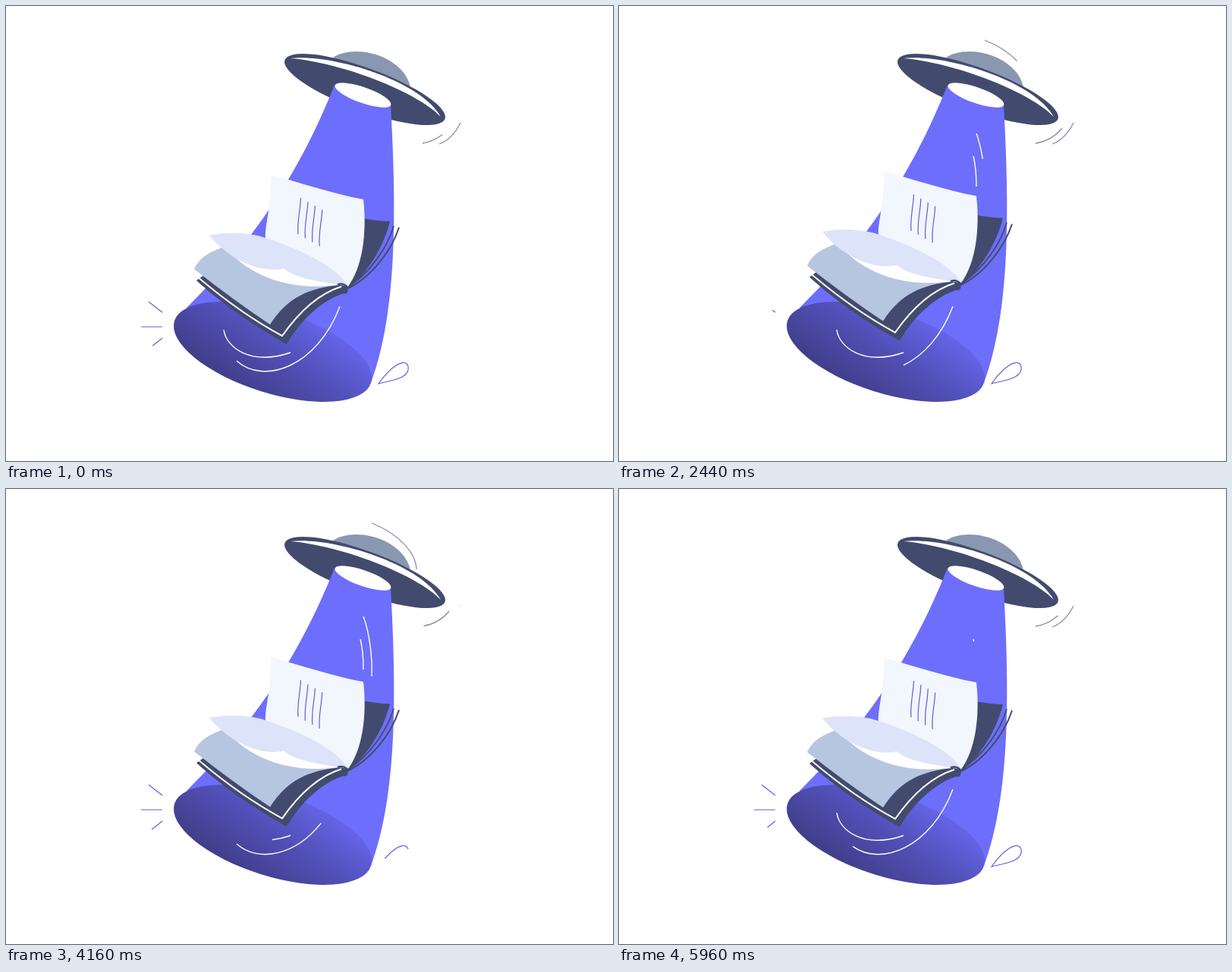
These frames come from a looping animation (800x600 px, 6000 ms). An HTML page with a canvas:

```html
<!DOCTYPE html>
<html lang="en">
<head>
<meta charset="utf-8">
<title>Saucer and book</title>
<style>
html, body { margin: 0; width: 100%; height: 100%; overflow: hidden; background: #fff; }
canvas { display: block; width: 800px; height: 600px; }
</style>
</head>
<body>
<canvas id="stage" width="800" height="600"></canvas>
<script>
const ctx = document.getElementById('stage').getContext('2d');

const NAVY = '#424b6d', BEAM = '#6d6efb', WHITE = '#fff';
const GREY = '#8b8ba6', INDIGO = '#625fd6';
const LOOP = 6000, CYCLE = 3000, STEP = 40;

const mod = (v, n) => ((v % n) + n) % n;
const clamp = v => Math.min(1, Math.max(0, v));

function fill(d, color) {
  ctx.fillStyle = color;
  ctx.fill(new Path2D(d));
}

function line(d, color, width) {
  ctx.strokeStyle = color;
  ctx.lineWidth = width;
  ctx.stroke(new Path2D(d));
}

function oval(x, y, rx, ry, deg, color) {
  ctx.fillStyle = color;
  ctx.beginPath();
  ctx.ellipse(x, y, rx, ry, deg * Math.PI / 180, 0, Math.PI * 2);
  ctx.fill();
}

// A stroke that draws itself in from its far end, then erases from that end.
function trail(d, color, width, on, off, dur) {
  const probe = document.createElementNS('http://www.w3.org/2000/svg', 'path');
  probe.setAttribute('d', d);
  return { path: new Path2D(d), len: probe.getTotalLength(), color, width, on, off, dur };
}

const trails = [
  // around the saucer
  trail('M482,45 C515,58 540,82 541,106', GREY, 1.3, 0, 2110, 770),
  trail('M549,181 C562,179 575,172 584,161', GREY, 1.3, 775, 2880, 400),
  trail('M571,182 C582,178 592,168 599,154', GREY, 1.3, 1155, 255, 340),
  // in the beam
  trail('M471,168 C479,190 483,220 482,247', WHITE, 1.4, 0, 2100, 600),
  trail('M467,198 C470,210 471,222 471,238', WHITE, 1.4, 440, 2480, 520),
  // under the book
  trail('M287,427 C290,450 322,475 375,457', WHITE, 1.4, 1020, 100, 600),
  trail('M304,468 C340,500 410,476 440,396', WHITE, 1.4, 1670, 780, 1330),
  // drop
  trail('M530,475 C528,469 522,469 514,474 C505,480 498,488 491,498 C512,493 533,490 530,475',
    INDIGO, 1.2, 1500, 616, 876),
  // sparks
  trail('M188,390 L206,404', INDIGO, 1.2, 2390, 1500, 240),
  trail('M178,423 L206,423', INDIGO, 1.2, 2600, 1700, 240),
  trail('M192,449 L206,438', INDIGO, 1.2, 2780, 1900, 240)
];

function span(s, from, to) {
  if (to - from < 0.001) return;
  ctx.strokeStyle = s.color;
  ctx.lineWidth = s.width;
  ctx.setLineDash([0, from * s.len, (to - from) * s.len + (to === 1 ? 1 : 0), s.len * 2]);
  ctx.stroke(s.path);
  ctx.setLineDash([]);
}

function drawTrail(s, t) {
  const sinceOn = mod(t - s.on, CYCLE), sinceOff = mod(t - s.off, CYCLE);
  if (sinceOn < mod(s.off - s.on, CYCLE)) span(s, 1 - clamp(sinceOn / s.dur), 1);
  if (sinceOff < s.dur) span(s, 0, 1 - sinceOff / s.dur);
}

const shade = ctx.createLinearGradient(314, 507, 394, 395);
shade.addColorStop(0, '#413f8b');
shade.addColorStop(0.5, '#5250b8');
shade.addColorStop(1, '#6767ee');

function drawScene() {
  // saucer
  fill('M431,68 C445,58 475,56 502,70 C522,81 531,95 533,108 L480,100 Z', '#8a97b0');
  oval(473, 110, 112.5, 28, 20.27, NAVY);
  fill('M375,69 C430,63 546,98 573,146 C542,113 440,74 375,69 Z', WHITE);
  // beam
  fill('M433,104 C402,182 350,288 238,398 L481,497 C517,400 514,260 507,130 Z', BEAM);
  oval(470.5, 117.5, 39, 10.4, 19.3, WHITE);
  oval(351.5, 456, 135.8, 54.3, 17.54, shade);
}

function drawBook() {
  // standing half
  fill('M465,279 Q490,284 506,284 C497,320 476,352 450,374 Z', NAVY);
  line('M511,290 C503,318 480,352 450,371', NAVY, 1.8);
  line('M518,292 C508,323 480,360 447,374', NAVY, 2);
  fill('M349.5,222.5 C390,233.5 430,247.5 471,255 C476,300 470,345 450,371 L342,306 C341,288 350,265 349.5,222.5 Z',
    '#f2f6fd');
  for (let i = 0; i < 4; i++) {
    const x = 388.5 + i * 9.4, y = 253 + i * 5.2;
    line(`M${x},${y} c-1,20 -5,30 -3.5,48`, INDIGO, 1.2);
  }
  // lying half
  fill('M251,362 L262,354 L348,420 C370,385 400,370 438,366 C449,364 453,371 448,378 ' +
    'C416,387 387,416 370,446 C330,424 285,393 251,362 Z', NAVY);
  line('M254,358.5 C290,389 325,414 364,435 C385,405 410,380 442,370', WHITE, 2);
  fill('M248,347 C255,331 270,323 290,317 L380,345 L440,368 C400,372 372,383 348,420 Q300,388 248,347 Z',
    '#b7c6e0');
  fill('M288,317 C318,354 372,378 442,367 L366,330 Z', WHITE);
  fill('M268,302 C300,297 325,300 343,306 C385,320 438,344 451,370 C425,364 385,362 366,346 ' +
    'C340,353 295,337 268,302 Z', '#dde3f8');
  line('M437,367.5 C443,365 449,368 451,372', NAVY, 2.5);
  oval(446.5, 375, 4, 4.5, 0, NAVY);
}

function draw(t) {
  ctx.fillStyle = WHITE;
  ctx.fillRect(0, 0, 800, 600);
  drawScene();
  ctx.save();
  ctx.translate(0, -5.5 * (1 - Math.cos(t * Math.PI / 1000)));
  drawBook();
  ctx.restore();
  for (const s of trails) drawTrail(s, t);
}

function tick() {
  const t = performance.now() % LOOP;
  draw(Math.floor(t / STEP) * STEP);
  requestAnimationFrame(tick);
}
tick();
</script>
</body>
</html>
```
